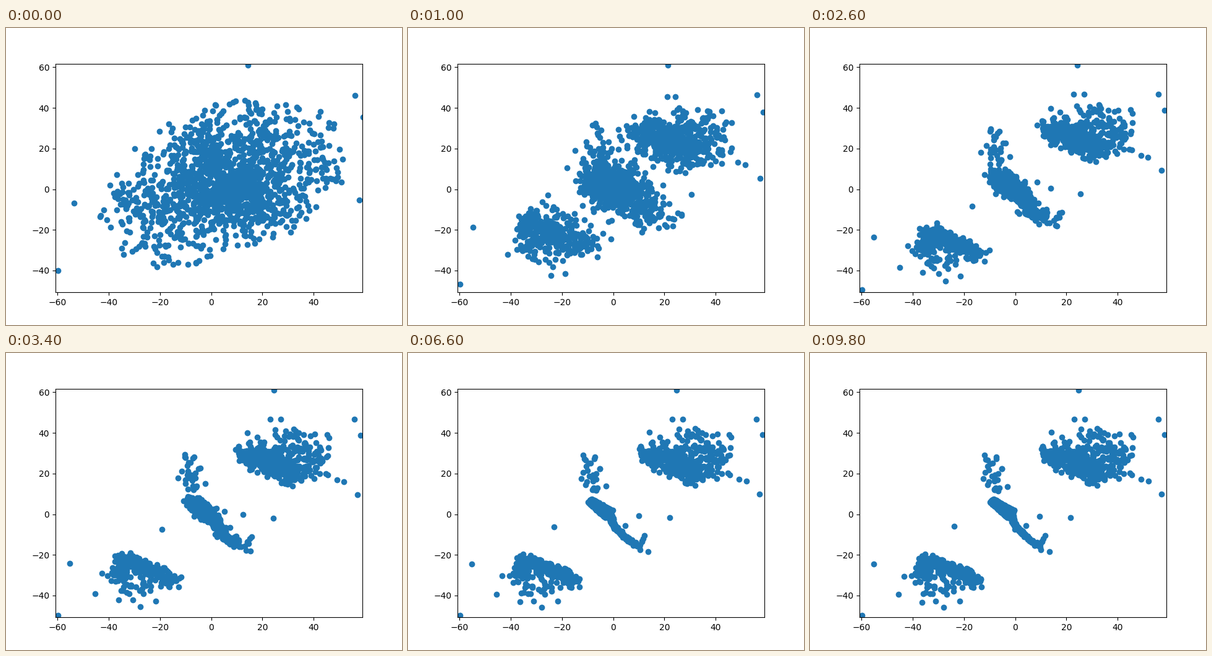
Animation, 640 px wide and 480 px high, one loop 10 s. Source, as a matplotlib script:

```python
import numpy as np
import matplotlib.pyplot as plt
from matplotlib.animation import FuncAnimation

FRAMES, STEP = 50, 200
rng = np.random.default_rng(12)


def gauss(n, spread, center=(0, 0)):
    return rng.normal(center, spread, (n, 2))


def along(n, pts, width, power=1.0):
    """Points scattered around a polyline, denser at its start if power > 1."""
    px, py = np.array(pts, float).T
    s = rng.random(n) ** power * (len(pts) - 1)
    k = np.arange(len(pts))
    line = np.column_stack([np.interp(s, k, px), np.interp(s, k, py)])
    return line + gauss(n, width)


def group(pos, off, noise, tau):
    """End places, start offsets and decay times; far starts are dropped."""
    pos = np.array(pos, float)
    n = len(pos)
    off = np.broadcast_to(off, pos.shape) + gauss(n, noise)
    x, y = ((pos + off - (4, 3)) / (45, 40)).T
    keep = (x * x + y * y - .7 * x * y < 1) | (np.max(noise) == 0)
    return pos[keep], off[keep], rng.uniform(*tau, n)[keep]


def pull_right(pos):
    x, y = pos.T
    return np.column_stack([.35 * (x - 55), np.minimum(0, .4 * (y - 48))])


def pull_left(pos):
    x, y = pos.T
    return np.column_stack([6 + .35 * (x + 43), 17 + .3 * (y + 26)])


def right_cluster():
    dense = along(300, [(14, 30), (19, 28), (23, 26), (27, 23), (33, 19)], (2.6, 2.8))
    loose = gauss(260, (9.5, 8), (29, 29))
    pos = np.vstack([dense, loose])
    x, y = pos.T
    pos = pos[(y > 31 - .58 * x) & (x > 10) & (x < 46.5) & (y < 43) & (y > 11)]
    crown = along(14, [(7, 44), (20, 48), (32, 50), (46, 52)], (1, 2))
    edge = np.array([(24.8, 60.9), (58.2, 39), (55.9, 46.7), (57, 10),
                     (51.9, 16.3), (49.2, 17.3)])
    return [group(pos, pull_right(pos), 12, (.45, 1)),
            group(crown, pull_right(crown), 3, (.6, .9)),
            group(edge, pull_right(edge), 0, (.8, .9))]


def left_cluster():
    dense = along(210, [(-34, -22), (-31, -24), (-28, -26), (-23, -27.5),
                        (-19, -30), (-14.5, -35)], (1.7, 1.6), 1.2)
    lobe = along(30, [(-39, -31), (-34, -27)], 1.2)
    loose = gauss(90, (8, 6), (-30, -29))
    pos = np.vstack([dense, lobe, loose])
    x, y = pos.T
    pos = pos[(y < np.minimum(-18, -.5 * x - 36)) & (y > -44) & (x < -13) & (x > -46)]
    edge = np.array([(-59.8, -49.9), (-55.2, -24.4), (-27.8, -45.8)])
    return [group(pos, pull_left(pos), (10, 12), (.6, 1.2)),
            group(edge, pull_left(edge), 0, (.8, .9))]


def middle_cluster():
    # A wedge that widens towards the origin, then a thin curved tail
    n = 460
    s = rng.random(n)
    w = rng.uniform(-1, 1, n) * (1.1 + 1.2 * s)
    core = np.column_stack([-9.3 + 7.7 * s + .67 * w, 6.8 - 6.8 * s + .74 * w])
    tail = along(210, [(-1.4, -1.5), (-.6, -4.3), (1, -7.3), (4, -10.8),
                       (7.2, -14), (9, -15.5)], .35, 1.6)
    plume = along(28, [(-8.2, 10), (-8, 14), (-9, 18), (-8.5, 22), (-10, 29)], (2, 1))
    hook = along(10, [(9.6, -19), (9.6, -15), (11, -12), (13.5, -6.6)], .15)
    stray = [(-6.8, -27.8), (.8, -20.5), (13.3, -18.4), (4, -5.6), (9.3, -1),
             (21.6, -1.7), (28.6, -1.3), (-24, -6)]
    return [group(core, (8, -3), (10, 9.5), (1.2, 1.7)),
            group(tail, (13, 0), (8, 9), (1.5, 1.9)),
            group(plume, (5, 6), 5, (1.6, 1.9)),
            group(hook, (24, -2), 3, (1.9, 2)),
            group(stray, (18, -4), 5, (1.9, 2))]


groups = right_cluster() + left_cluster() + middle_cluster()
end, offset, tau = (np.concatenate(part) for part in zip(*groups))


def positions(frame):
    t = frame * STEP / 1000
    return end + offset * np.exp(-t / tau)[:, None]


fig, ax = plt.subplots(figsize=(6.4, 4.8), dpi=100)
dots = ax.scatter(*positions(0).T, color="#1f77b4")
ax.set_xlim(-60.74, 59)
ax.set_ylim(-50.73, 61.77)


def update(frame):
    dots.set_offsets(positions(frame))
    return dots,


anim = FuncAnimation(fig, update, frames=FRAMES, interval=STEP,
                     init_func=lambda: update(0), repeat=True, repeat_delay=0)
plt.show()
```
